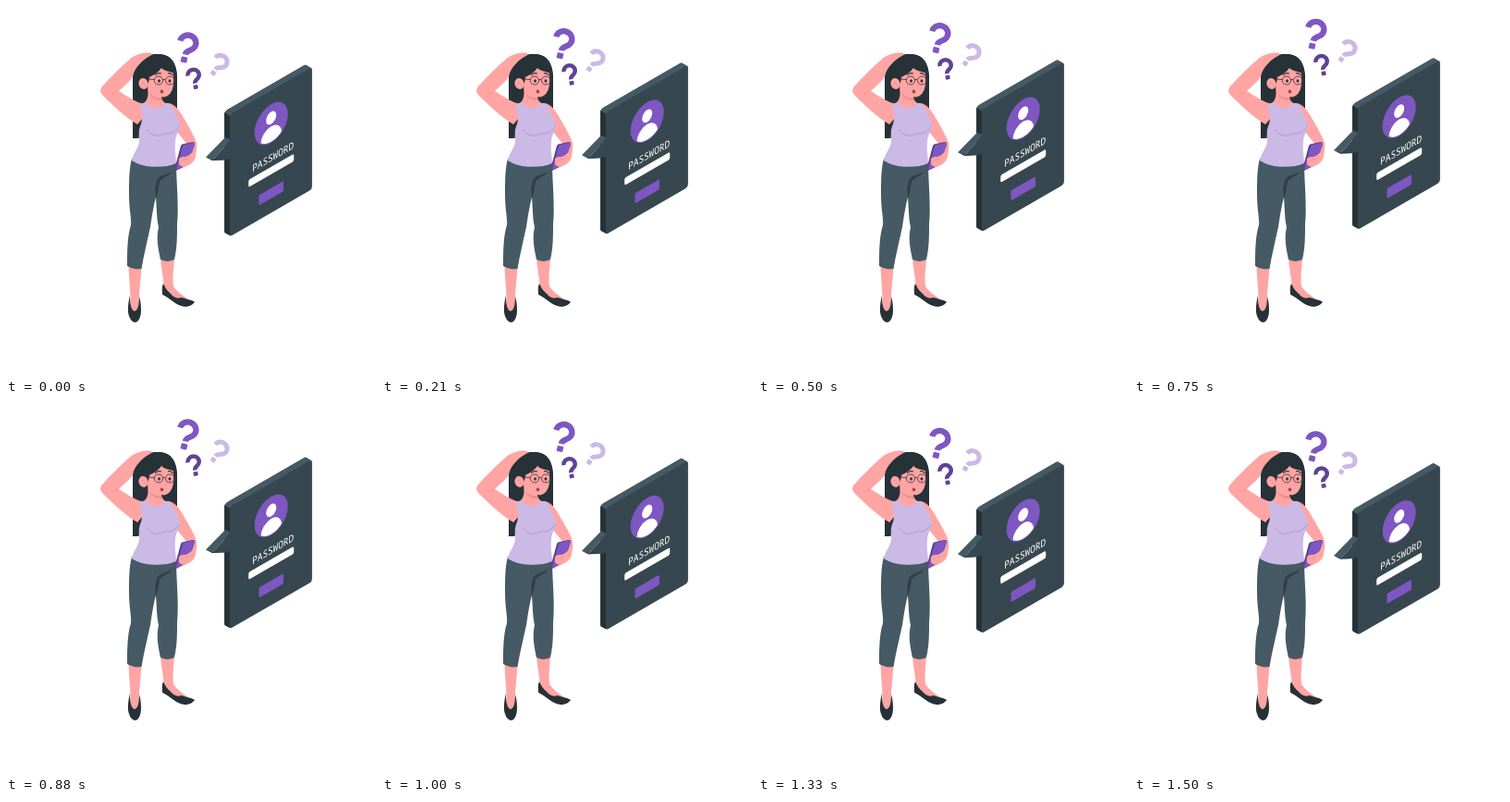
These frames come from a looping animation (400x400 px, 1540 ms). An HTML page with a canvas:

```html
<!DOCTYPE html>
<html lang="en">
<head>
<meta charset="utf-8">
<title>Forgotten password</title>
<style>
html, body { margin: 0; width: 100%; height: 100%; overflow: hidden; background: #fff; }
canvas { display: block; width: 400px; height: 400px; }
</style>
</head>
<body>
<canvas id="stage"></canvas>
<script>
const canvas = document.getElementById('stage');
const ctx = canvas.getContext('2d');
const ratio = window.devicePixelRatio || 1;
canvas.width = canvas.height = 400 * ratio;

const LOOP = 1540, STEPS = 37, STEP = 1000 / 24;
const SKIN = '#ffa5a4', SKIN_SHADE = '#f28f8f', HAIR = '#263238';
const SHIRT = '#cbb9e6', SHIRT_SHADE = '#b29ad6';
const PANTS = '#455a64', PANTS_SHADE = '#2f3f47';
const PURPLE = '#7e57c2', DARK_PURPLE = '#5f4294';
const FRONT = '#37474f', TOP = '#455a64', SIDE = '#263238';

function fill(path, color) {
  ctx.fillStyle = color;
  ctx.fill(new Path2D(path));
}

function line(path, color, width = 0.8) {
  ctx.strokeStyle = color;
  ctx.lineWidth = width;
  ctx.stroke(new Path2D(path));
}

function oval(x, y, rx, ry, color, angle = 0) {
  ctx.beginPath();
  ctx.ellipse(x, y, rx, ry, angle, 0, Math.PI * 2);
  ctx.fillStyle = color;
  ctx.fill();
}

function roundBox(x, y, w, h, r, color) {
  ctx.beginPath();
  ctx.roundRect(x - w / 2, y - h / 2, w, h, r);
  ctx.fillStyle = color;
  ctx.fill();
}

// Runs a drawing on the isometric wall plane, with its origin at (x, y).
function onWall(x, y, draw) {
  ctx.save();
  ctx.transform(0.866, -0.5, 0, 1, x, y);
  draw();
  ctx.restore();
}

function drawLegs() {
  fill('M132.5 281 L146.5 282 C146 295 144 305 144 316 L144 333 L134 333 C136 315 133 300 132.5 281Z', SKIN);
  fill('M167 273 L182 273 C181 286 180 295 181 303 C185 309 191 313 197 317 L186 321 L171 309 C171 296 168 286 167 273Z', SKIN);
  fill('M134 313 C132 321 131 330 133 335 C135 341 138 342 140 342 C144 341 146 335 146 329 C146 322 145 317 144 314 C144 322 143 329 139 330 C135 329 134 321 134 313Z', HAIR);
  fill('M170 300 C168 304 169 308 169 312 C177 315 183 324 193 325 C198 325 202 323 204 320 C200 317 194 317 190 315 C186 317 181 315 178 311 C174 308 172 304 170 300Z', HAIR);
  fill('M136 165 C133 176 133 190 133 204 C133 220 136 231 135 237 C131 249 131 268 131 281 C136 284 141 285 146.5 284 C149 269 153 253 156 239 C158 225 160 214 162 207 C163 220 163 231 165 239 C162 252 165 264 167 274 C173 277 178 276 182 274 C185 262 185 249 185 236 C187 215 184 190 184 169Z', PANTS);
  fill('M180 178 C174 183 166 183 164 187 C161 193 161 201 162 208 C164 202 165 196 166 190 C169 185 176 185 180 178Z', PANTS_SHADE);
}

function drawHair() {
  fill('M137 143 L137 78 C137 62 149 51 164 52 C178 52 185 63 185 78 L185 113 L167 119 L143 143Z', HAIR);
}

function drawTorso() {
  // near arm
  fill('M173 105 C181 104 186 111 191 119 C196 128 203 139 206 148 C207 156 205 162 200 167 L190 164 L196 150 C192 144 185 137 181 130Z', SKIN);
  // neck and chest
  fill('M153 87 C154 95 154 101 149 105 C151 113 170 116 175 106 C169 104 168 101 168 95Z', SKIN);
  fill('M155 94 C158 98 163 100 168 99 L168 102 C162 103 157 100 155 94Z', SKIN_SHADE);
  // raised arm
  fill('M159 52 C154 49 144 51 137 55 C127 63 111 79 104 87 C101 91 102 94 105 97 C116 108 130 121 142 128 L149 120 L149 106 C140 104 130 97 122 92 C128 86 135 81 137 76 C139 67 147 58 159 52Z', SKIN);
  line('M122 92 C119 94 116 95 114 95', SKIN_SHADE, 1);
  // shirt
  fill('M145 106 L151 104 C154 111 168 114 172 105 L178 106 C181 114 187 121 188 128 C188 135 183 139 183 147 C182 157 184 163 184 170 C171 176 147 175 136 167 C137 160 143 154 144 147 C144 140 143 136 145 130 C149 122 146 114 145 106Z', SHIRT);
  line('M152 133 C156 141 166 142 171 138 C179 139 185 135 187 130', SHIRT_SHADE, 1);
}

function drawPhone() {
  fill('M182 177 L189 151 Q190 149 192 149 L202 147 Q204 147 204 149 L197 170 Q196 172 194 173 L184 178Z', DARK_PURPLE);
  fill('M184 177 L191 152 Q191 150 193 150 L202 148 Q204 148 204 150 L197 170 Q196 172 194 173Z', PURPLE);
  fill('M206 152 C202 157 200 161 194 163 C188 163 186 165 187 168 C186 171 188 173 192 174 C198 173 204 168 205 163Z', SKIN);
  line('M188 168 C191 166 194 166 197 165', SKIN_SHADE);
}

function drawHead() {
  fill('M152 75 C153 66 161 62 170 62 C177 62 181 68 181 76 C182 86 180 97 171 98.5 C161 98 154 93 153 86Z', SKIN);
  fill('M168 67 C164 73 158 75 155 77 C155 80 154 83 152 87 L146 81 C145 64 153 53 165 52 C178 52 185 61 185 78 L185 100 L180 95 C182 87 182 79 181 72 C176 71 171 70 168 67Z', HAIR);
  oval(148.5, 84, 5, 6, SKIN, -0.2);
  line('M146 82 C149 82 150 84 151 87', SKIN_SHADE);
  line('M161 75 C163 72 165 72 168 73 M175 73 C177 72 179 73 180.5 75', HAIR, 1.2);
  oval(165.5, 81, 1.4, 1.8, HAIR);
  oval(177, 81, 1.4, 1.8, HAIR);
  line('M172 81 C173 85 175 87 172 87', SKIN_SHADE, 1);
  oval(168.5, 92.5, 1.7, 1.9, '#a83e4d');
  ctx.strokeStyle = '#5e3444';
  ctx.lineWidth = 0.9;
  for (const x of [165, 177.3]) {
    ctx.beginPath();
    ctx.ellipse(x, 80.5, 4.7, 4.5, 0, 0, Math.PI * 2);
    ctx.stroke();
  }
  line('M153 79 L160.3 79.5 M169.7 80 Q171.2 78.5 172.6 80', '#5e3444', 0.9);
}

function drawAvatar() {
  oval(0, 0, 20.8, 20.8, PURPLE);
  oval(0, -6, 6.4, 6.6, '#fff');
  ctx.beginPath();
  ctx.arc(0, 0, 19.8, 0, Math.PI * 2);
  ctx.clip();
  oval(0, 16, 13, 13, '#fff');
}

function drawPanel(lift) {
  ctx.save();
  ctx.translate(0, 0.4 - lift);
  const plate = color => roundBox(0, 0, 102.4, 132, 3, color);
  for (let d = 6; d > 0; d -= 0.5) {
    onWall(286.5 - d, 157.6 - d * 0.577, () => plate(TOP));
  }
  fill('M236 115 L242.5 119 L242.5 248.5 L237 245.5 Q236 245 236 243.5Z', SIDE);
  onWall(286.5, 157.6, () => plate(FRONT));
  fill('M216 163.5 L237 142 L243 145 L223 167Z', TOP);
  fill('M223 167 L243 145 L243 165 L238 166.5Z', FRONT);
  fill('M216 163.5 L223 167 L238 166.5 L222 166Z', SIDE);

  onWall(286.7, 127, drawAvatar);
  onWall(288.6, 162.8, () => {
    ctx.font = '500 10.8px "Noto Sans Mono", monospace';
    ctx.textAlign = 'center';
    ctx.textBaseline = 'alphabetic';
    ctx.fillStyle = '#fff';
    ctx.fillText('PASSWORD', 0, 4);
  });
  onWall(286.7, 178, () => roundBox(0, 0, 56.6, 8, 2, '#fff'));
  onWall(286.7, 202.5, () => roundBox(0, 0, 30.6, 11, 1.5, PURPLE));
  ctx.restore();
}

function drawQuestion(x, y, size, degrees, color) {
  ctx.save();
  ctx.translate(x, y);
  ctx.rotate(degrees * Math.PI / 180);
  ctx.scale(size, size);
  line('M-8.7 -6.4 A8.7 8.2 0 1 1 8 -3 C5.8 2 0 1.3 0 6.8', color, 6.3);
  roundBox(0, 12.5, 6.8, 6.2, 1, color);
  ctx.restore();
}

function drawScene(rise) {
  ctx.setTransform(ratio, 0, 0, ratio, 0, 0);
  ctx.fillStyle = '#fff';
  ctx.fillRect(0, 0, 400, 400);
  drawHair();
  drawLegs();
  drawTorso();
  drawPhone();
  drawHead();
  drawPanel(8 * rise);
  const lift = 16 * rise - 0.7;
  drawQuestion(195.3, 46 - lift, 1, 13, PURPLE);
  drawQuestion(203.4, 79 - lift, 0.71, -11, DARK_PURPLE);
  drawQuestion(229.5, 64.2 - lift, 0.8, 33, SHIRT);
}

// Straight rise and fall, stepped at 24 pictures per second.
function tick() {
  const time = performance.now() % LOOP;
  const step = Math.min(STEPS - 1, Math.floor((time + 4.9) / STEP));
  const phase = (step + 1) / STEPS;
  drawScene(1 - Math.abs(2 * phase - 1));
  requestAnimationFrame(tick);
}
tick();
</script>
</body>
</html>
```
